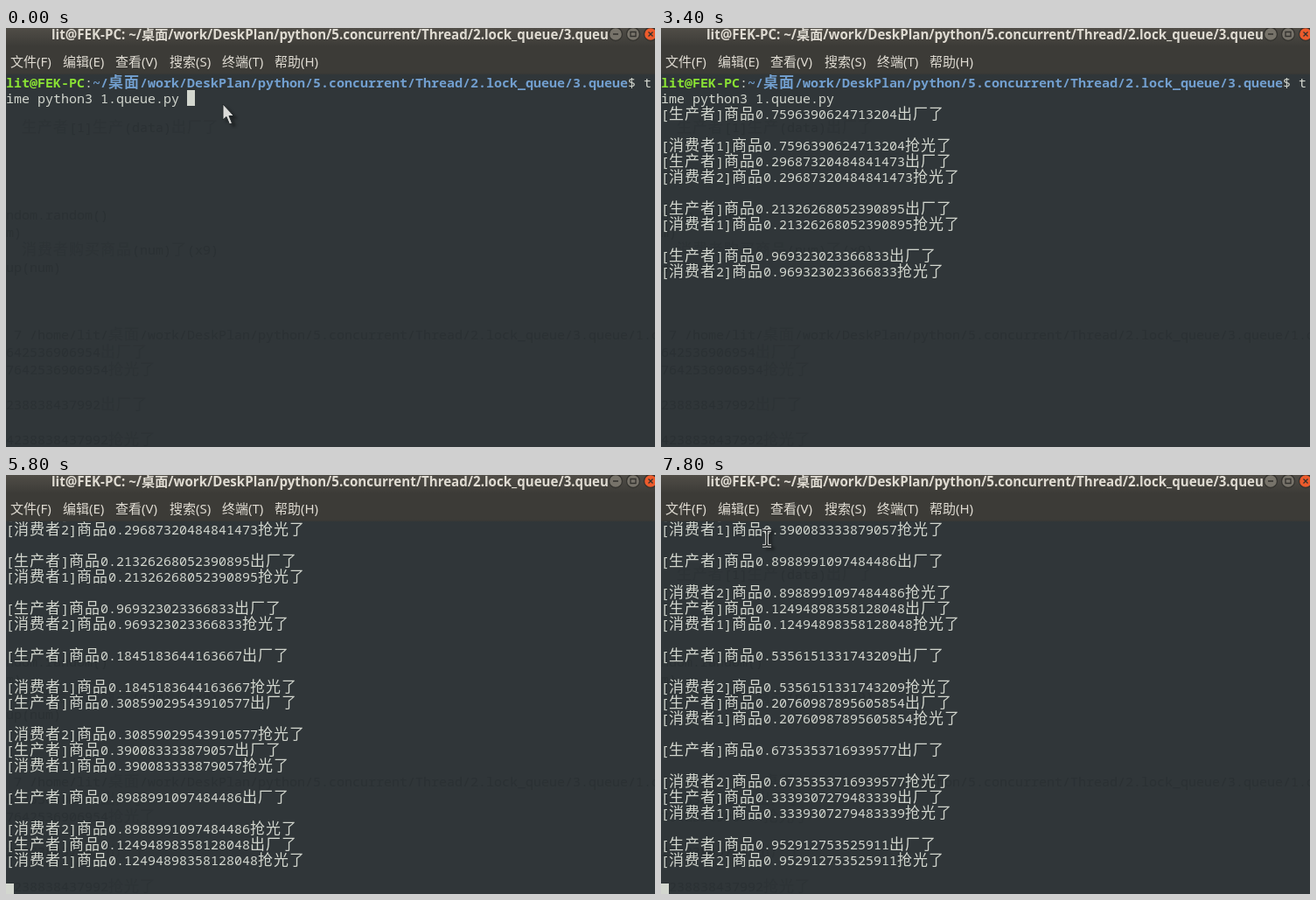
An HTML page for the animation above (8000 ms loop, 742 by 479 pixels).

```html
<!DOCTYPE html>
<html lang="zh-CN">
<head>
<meta charset="utf-8">
<title>Terminal</title>
<style>
  html, body { margin: 0; width: 100%; height: 100%; overflow: hidden; background: #303639; }
  #stage { position: relative; width: 742px; height: 479px; overflow: hidden; }
  #stage > *, .bar > *, .menu span, #screen > *, .mono div { position: absolute; white-space: pre; }

  .bar { left: 0; top: 0; width: 742px; height: 53px;
    background: linear-gradient(#504d47, #3c3b37 21px, #3c3b37 51px, #363735 53px);
    color: #dfdbd2; font-family: "Noto Sans", "Noto Sans CJK SC", "Noto Sans CJK", sans-serif; }
  .title { left: 52px; top: -4px; width: 637px; overflow: hidden; font-size: 15.1px; font-weight: bold; line-height: 22px; }
  .menu { left: 0; top: 27px; font-size: 15px; line-height: 22px; }
  .buttons { left: 686px; top: -4px; }

  #screen { left: 0; top: 53px; width: 742px; height: 426px; overflow: hidden; }
  .mono { color: #d3d7cf; font: 15px/18px "Noto Sans Mono", "DejaVu Sans Mono", monospace; }
  .mono i { font: 17px/0 "Noto Sans CJK SC", "Noto Sans CJK", sans-serif; letter-spacing: 1px; }
  .mono b i { font-weight: bold; }
  .mono div { left: 0; top: 0; height: 18px; }
  #ghost { left: 0; top: 0; color: #2b3134; }
  #ghost i { color: #2d3336; }
  .user { color: #8ae234; }
  .path { color: #729fcf; }
  #caret { width: 9px; background: #d3d7cf; }
  .pointer { left: 0; top: 0; overflow: visible; filter: drop-shadow(4px 3px 1.5px #0005); }
</style>
</head>
<body>
<div id="stage">
  <div class="bar">
    <div class="title" id="title"></div>
    <div class="menu" id="menu"></div>
    <svg class="buttons" width="56" height="24" fill="none" stroke-width="1.3">
      <g fill="#77736a" stroke="#34332f"><circle cx="11" cy="11" r="7.5"/><circle cx="31" cy="11" r="7.5"/></g>
      <circle cx="51" cy="11" r="7.5" fill="#ec5b2c" stroke="#34332f"/>
      <path d="M8 11h6M28 8.500h6v5h-6zM48.500 8.500l5 5m0-5l-5 5" stroke="#32312d"/>
    </svg>
  </div>
  <div id="ghost" class="mono"></div>
  <div id="screen" class="mono">
    <div id="lines"></div>
    <div id="caret"></div>
  </div>
  <svg id="arrow" class="pointer" width="16" height="26">
    <path d="M1 1V19L5 15.500L8.500 24L11.500 22.800L8 14.500H13.500Z" fill="#dcdcda" stroke="#22282a"/>
  </svg>
  <svg id="beam" class="pointer" width="1" height="1" fill="none">
    <defs><path id="beamShape" d="M-5-9H-2Q0-9 0-7V7Q0 9-2 9H-5M5-9H2Q0-9 0-7M0 7Q0 9 2 9H5"/></defs>
    <use href="#beamShape" stroke="#e6e6e4" stroke-width="3.6"/>
    <use href="#beamShape" stroke="#15191a" stroke-width="1.6"/>
  </svg>
</div>
<script>
const LOOP = 8000, ROW = 18, LAST_ROW = 23;
const $ = id => document.getElementById(id);

const user = 'lit@FEK-PC';
const folder = '/桌面/work/DeskPlan/python/5.concurrent/Thread/2.lock_queue/3.queue';

// Wide characters take two cells.
const wide = text => text.replace(/[\u4e00-\u9fff]+/g, '<i>$&</i>');

const addLine = (parent, top, html) => {
  const line = document.createElement('div');
  line.style.top = top + 'px';
  line.innerHTML = html;
  parent.append(line);
  return line;
};

$('title').textContent = `${user}: ~${folder}`;
['文件(F)', '编辑(E)', '查看(V)', '搜索(S)', '终端(T)', '帮助(H)'].forEach((label, i) => {
  const item = document.createElement('span');
  item.textContent = label;
  item.style.left = 5 + i * 60 + (i > 2 ? 2 : 0) + 'px';
  $('menu').append(item);
});

// Faint text of the window behind the translucent terminal.
[
  [104, '  生产者[1]生产(data)出厂了'],
  [204, 'ndom.random()'],
  [224, 'm)'],
  [244, '  消费者购买商品(num)了(x9)'],
  [264, 'up(num)'],
  [341, ` 7 /home/lit${folder}/1.queue.py`],
  [361, '642536906954出厂了'],
  [381, '7642536906954抢光了'],
  [421, '238838437992出厂了'],
  [461, '4238838437992抢光了'],
].forEach(([top, text]) => addLine($('ghost'), top, wide(text)));

// Each product: its number, and whether a blank line parts maker and buyer (else one follows).
const products = [
  ['0.7596390624713204', 1], ['0.29687320484841473', 0], ['0.21326268052390895', 0],
  ['0.969323023366833', 0], ['0.1845183644163667', 1], ['0.30859029543910577', 1],
  ['0.390083333879057', 0], ['0.8988991097484486', 1], ['0.12494898358128048', 0],
  ['0.5356151331743209', 1], ['0.20760987895605854', 0], ['0.6735353716939577', 1],
  ['0.3339307279483339', 0], ['0.952912753525911', 0],
];
const transcript = [
  `<b class="user">${user}</b>:<b class="path">~${wide(folder)}</b>$ t`,
  'ime python3 1.queue.py',
];
products.forEach(([number, parted], i) => {
  const made = wide(`[生产者]商品${number}出厂了`);
  const sold = wide(`[消费者${i % 2 + 1}]商品${number}抢光了`);
  transcript.push(...(parted ? [made, '', sold] : [made, sold, '']));
});
const lines = transcript.map((html, i) => addLine($('lines'), i * ROW, html));

// [time, line the caret stands on]
const output = [
  [0, 1], [700, 2], [1600, 4], [1700, 5], [2400, 8], [2800, 11], [3000, 14],
  [3900, 16], [4000, 17], [4100, 20], [4400, 23], [4800, 26], [5800, 29], [6200, 32],
  [6400, 35], [6500, 37], [6600, 38], [7400, 41], [7700, 44],
];
const blinks = [1000, 1600, 2400, 2800, 3400, 4000, 4600, 5400, 6200, 6600, 7200, 7800];

// [time, x, y] of the text pointer
const beamPath = [[6700, 257, 89], [6900, 255, 90], [7200, 235, 104], [7300, 235, 104], [7800, 121, 72]];

const place = (el, x, y) => { el.style.transform = `translate(${x}px, ${y}px)`; };
const show = (el, on) => { el.style.visibility = on ? 'visible' : 'hidden'; };

function pointAt(path, t) {
  const next = path.findIndex(key => key[0] > t);
  if (next < 0) return path.at(-1).slice(1);
  const [t0, x0, y0] = path[next - 1], [t1, x1, y1] = path[next];
  const k = (t - t0) / (t1 - t0);
  return [Math.round(x0 + (x1 - x0) * k), Math.round(y0 + (y1 - y0) * k)];
}

function draw(t) {
  const current = output.findLast(step => step[0] <= t)[1];
  const scroll = Math.max(0, current - LAST_ROW);
  place($('lines'), 0, -scroll * ROW);
  lines.forEach((line, i) => show(line, i < current || i < 2));

  place($('caret'), t < 700 ? 207 : 0, (current - scroll) * ROW);
  show($('caret'), blinks.filter(time => time <= t).length % 2 === 0);

  show($('arrow'), t < 400);
  place($('arrow'), t < 200 ? 247 : 242, t < 200 ? 86 : 76);

  const step = Math.floor(t / 100) * 100;
  const beamVisible = step >= beamPath[0][0];
  show($('beam'), beamVisible);
  if (beamVisible) place($('beam'), ...pointAt(beamPath, step));
}

const start = performance.now();
function tick() {
  draw((performance.now() - start) % LOOP);
  requestAnimationFrame(tick);
}
tick();
</script>
</body>
</html>
```
